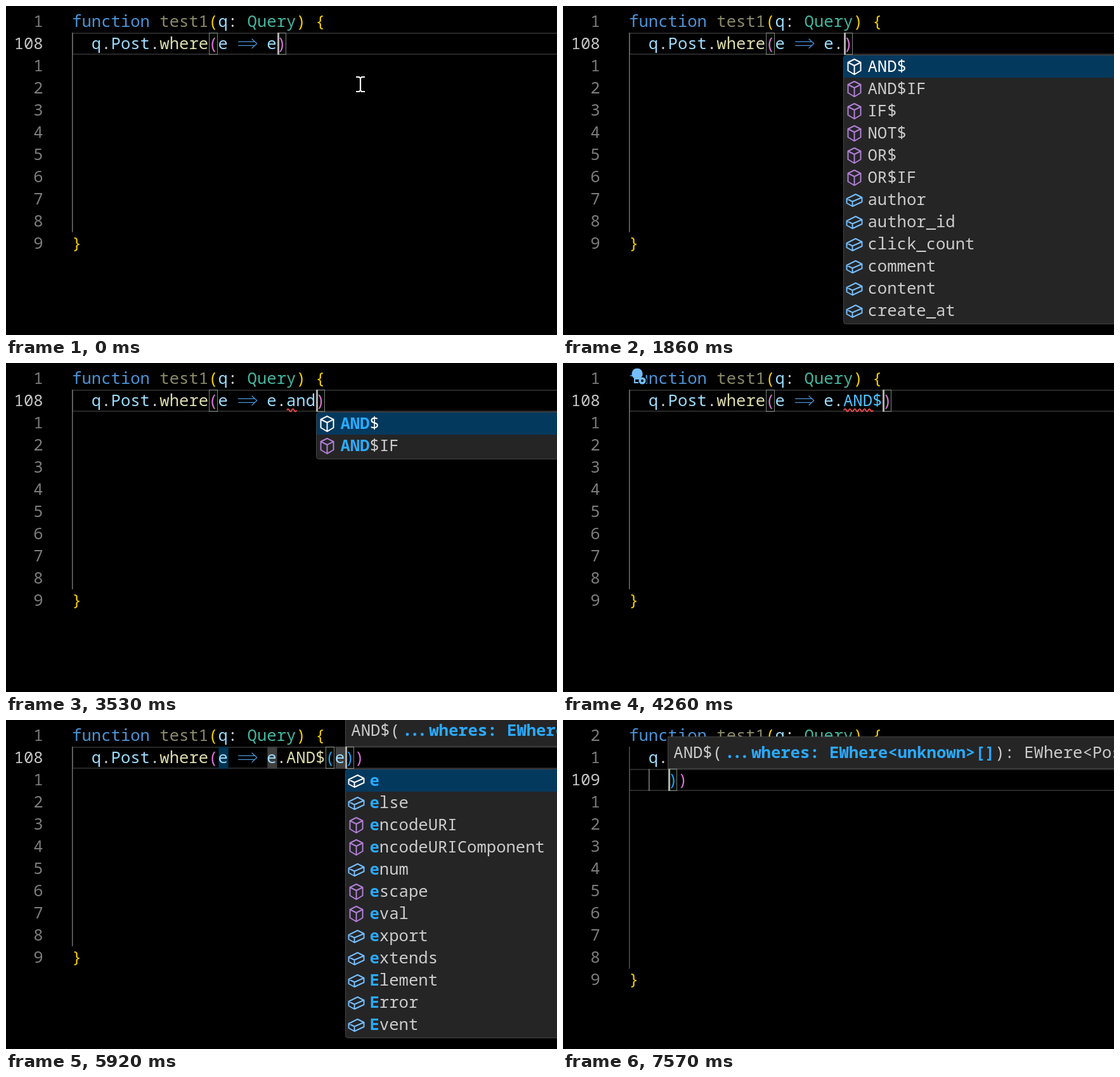
An HTML page that plays this animation: 869x519 px, repeating every 8000 ms.

```html
<!DOCTYPE html>
<html lang="en">
<head>
<meta charset="utf-8">
<title>Editor completion</title>
<style>
  html, body { margin: 0; width: 100%; height: 100%; overflow: hidden; background: #000; }
  svg { display: block; width: 869px; height: 519px; }
  text { font: 200 25.6px "Noto Sans Mono", "DejaVu Sans Mono", monospace; font-variant-ligatures: none; }
  .list { font-weight: 300; }
  .sig { font-weight: 450; }
  .b { font-weight: 700; fill: #2aaaff; }
</style>
</head>
<body>
<svg id="stage" viewBox="0 0 869 519"></svg>
<script>
const LOOP = 8000, CW = 15.36, LH = 35, X0 = 105, Y0 = 7;
const C = {
  key: '#4c93d6', fn: '#dcdcaa', dim: '#8a8a68', name: '#9cdcfe', type: '#45b59f', op: '#d4d4d4',
  konst: '#4fc1ff', p1: '#f2cc00', p2: '#da70d6', p3: '#179fff', method: '#b180d7', field: '#75beff'
};

// '*' marks the next letter as matched, a leading '#' marks a method.
const LISTS = {
  all: '#AND$ #AND$IF #IF$ #NOT$ #OR$ #OR$IF author author_id click_count comment content create_at',
  a: '*author *author_id #*AND$ #*AND$IF is_*archive create_*at delete_*at t*ags update_*at',
  an: '#*A*ND$ #*A*ND$IF',
  and: '#*A*N*D$ #*A*N*D$IF',
  e: '*e *else #*encodeURI #*encodeURIComponent *enum #*escape #*eval *export *extends *Element *Error *Event'
};

// Each step changes part of the state; "code" is what follows "e => e".
const STEPS = [
  [0, { code: '', caret: 1, mouse: 1 }],
  [70, { mouse: 0 }],
  [140, { marks: 1 }],
  [410, { caret: 0 }],
  [870, { caret: 1 }],
  [1400, { caret: 0 }],
  [1860, { code: '.', caret: 1, marks: 0, list: 'all' }],
  [2190, { bright: 1, wave: 1 }],
  [2390, { caret: 0 }],
  [2610, { code: '.a', caret: 1, wave: 0, list: 'a', hover: 7 }],
  [3010, { bright: 0, wave: 1 }],
  [3140, { caret: 0 }],
  [3400, { code: '.an', caret: 1, list: 'an', hover: -1 }],
  [3530, { code: '.and', list: 'and' }],
  [3930, { wave: 3 }],
  [4060, { code: '.AND$', list: '' }],
  [4190, { bulb: 1 }],
  [4390, { bulb: 0 }],
  [4520, { wave: 0 }],
  [4590, { caret: 0 }],
  [4850, { code: '.AND$()', caret: 1 }],
  [4990, { sig: 1 }],
  [5320, { caret: 0 }],
  [5650, { code: '.AND$(e)', caret: 1 }],
  [5720, { list: 'e' }],
  [5920, { marks: 1 }],
  [6180, { caret: 0 }],
  [6510, { list: '', marks: 0 }],
  [6640, { caret: 1 }],
  [6970, { split: 1, sig: 0 }],
  [7500, { sig: 1 }],
  [7570, { inner: 1 }]
];

const colX = c => X0 + c * CW;
const rowY = r => Y0 + r * LH;
const esc = s => s.replace(/&/g, '&amp;').replace(/</g, '&lt;');
const rect = (x, y, w, h, fill, more = '') =>
  `<rect x="${x}" y="${y}" width="${w}" height="${h}" fill="${fill}" ${more}/>`;
const path = (d, stroke, w, more = '') =>
  `<path d="${d}" fill="none" stroke="${stroke}" stroke-width="${w}" ${more}/>`;
const text = (x, y, s, fill, more = '') =>
  `<text x="${x}" y="${y}" fill="${fill}" ${more}>${s}</text>`;
const code = (row, col, s, fill) => text(colX(col) - .9, rowY(row) + 26, esc(s), fill);
const box = (row, col) =>
  rect(Math.round(colX(col)) + .5, rowY(row) + .5, 13, 34, '#006400',
    'fill-opacity=".1" stroke="#808080" stroke-width="1"');

function icon(x, y, method, color) {
  const d = method
    ? 'M0-12L10-7V6L0 12L-10 6V-7ZM-10-7L0-2L10-7M0-2V12'
    : 'M-12-2L2-9L12-4V3L-3 10L-12 5ZM-12-2L-3 2.5L12-4M-3 2.5V10';
  return path(d, color, 2, `stroke-linejoin="round" transform="translate(${x} ${y})"`);
}

function suggest(items, x, hover) {
  const rows = items.split(' ');
  let out = rect(x + .5, 77.5, 460, rows.length * LH + 4, '#252526', 'rx="4" stroke="#454545"');
  rows.forEach((raw, i) => {
    const method = raw[0] === '#', y = 78 + i * LH, on = i === 0;
    const label = raw.replace('#', '').replace(/\*(.)/g, '<tspan class="b">$1</tspan>');
    if (on || i === hover) out += rect(x + 1, y, 460, LH, on ? '#04395e' : '#2a2d2e');
    out += icon(x + 17.5, y + 18, method, on ? '#fff' : method ? C.method : C.field);
    out += text(x + 38.5, y + 26, label, on ? '#fff' : '#ccc', 'class="list"');
  });
  return out;
}

function signature(x, y) {
  const at = n => x + 9.3 + n * CW, base = y + 34;
  const dots = [98, 109.7, 121.4].map(d => `<circle cx="${x + d}" cy="${base - 2.3}" r="2.4" fill="#2aaaff"/>`);
  return rect(x + .5, y + .5, 900, 50, '#252526', 'stroke="#454545"') +
    text(at(0), base, 'AND$(', '#ccc', 'class="sig"') + dots.join('') +
    text(at(8), base, esc('wheres: EWhere<unknown>[]'), '#2aaaff', 'class="b"') +
    text(at(33), base, esc('): EWhere<Post>'), '#ccc', 'class="sig"');
}

function wave(col, n) {
  const count = Math.round(n * CW / 3.84);
  return path(`M${colX(col)} 74.5q1.92-4 3.84 0` + 't3.84 0'.repeat(count - 1), '#f14c4c', 1.8);
}

const bulb = () => rect(110, 8, 14, 26, '#000') +
  '<circle cx="125" cy="28" r="7.5" fill="#000"/>' +
  `<path d="M117 8.5a8.5 8.5 0 0 1 5 15.4V26H112V23.9A8.5 8.5 0 0 1 117 8.5Z" fill="${C.field}"/>` +
  path('M113 26V31H119', C.field, 2.2) +
  `<circle cx="125" cy="28" r="5.6" fill="${C.field}"/><circle cx="125" cy="28" r="2" fill="#000"/>`;

const mouse = () => path('M552 112H557L559 114L561 112H566M559 113V134M552 135H557L559 133L561 135H566', '#fff', 2.2);

function arrow(col) {
  const x = colX(col), y = 59.3;
  return path(`M${x} ${y - 3}h26M${x} ${y + 3}h26M${x + 21.5} ${y - 7.5}L${x + 29.5} ${y}L${x + 21.5} ${y + 7.5}`, C.key, 1.3);
}

function draw(s) {
  const active = s.split ? 2 : 1, last = active + 9;
  const call = s.code.includes('('), body = s.code.replace(/[.()]/g, '');
  const word = body.slice(0, call ? 4 : 9);
  const closeCol = 21 + s.code.length;
  const caretCol = s.split ? 4 : call ? closeCol - 1 : closeCol;
  let o = '';

  o += rect(105, rowY(active) + 1, 780, 33, 'none', 'stroke="#282828" stroke-width="2"');
  o += rect(104, 42, 1.5, (last - 1) * LH, s.inner ? '#505050' : '#707070');
  if (s.split) o += rect(135, rowY(2), 1.5, LH, s.inner ? '#808080' : '#505050');

  for (let r = 0; r <= last; r++) {
    const on = r === active;
    o += text(58.7, rowY(r) + 26, on ? 107 + active : Math.abs(r - active),
      on ? '#c6c6c6' : '#7c7c7c', 'text-anchor="end"');
  }

  if (s.marks) {
    o += rect(colX(15), 42, CW, LH, '#003452') + rect(colX(20), 42, CW, LH, '#3f3f3f');
    if (call) o += rect(colX(27), 42, CW, LH, '#3f3f3f');
  }
  if (s.split) o += box(1, 26) + box(2, 4);
  else o += box(1, call ? 26 : 14) + box(1, caretCol);

  o += code(0, 0, 'function', C.key) + code(0, 9, 'test1', s.bright ? C.fn : C.dim) +
    code(0, 14, '(', C.p1) + code(0, 15, 'q', C.name) + code(0, 16, ':', C.op) +
    code(0, 18, 'Query', C.type) + code(0, 23, ')', C.p1) + code(0, 25, '{', C.p1);
  o += code(1, 2, 'q', C.name) + code(1, 3, '.', C.op) + code(1, 4, 'Post', C.name) +
    code(1, 8, '.', C.op) + code(1, 9, 'where', C.fn) + code(1, 14, '(', C.p2) +
    code(1, 15, 'e', C.name) + arrow(17) + code(1, 20, 'e', C.name);
  if (s.code) o += code(1, 21, '.', C.op);
  if (word) o += code(1, 22, word, call ? C.fn : word[0] === 'A' ? C.konst : C.name);
  if (call) o += code(1, 26, '(', C.p3) + code(1, 27, body.slice(4), C.name);
  if (s.split) o += code(2, 4, ')', C.p3) + code(2, 5, ')', C.p2);
  else {
    if (call) o += code(1, caretCol, ')', C.p3);
    o += code(1, closeCol, ')', C.p2);
  }
  o += code(last, 0, '}', C.p1);

  const caretX = Math.round(colX(caretCol));
  if (s.wave) o += wave(22, s.wave);
  if (s.caret) o += rect(caretX, rowY(active), 3, LH, '#aeafad');
  if (s.list) o += suggest(LISTS[s.list], Math.floor(colX(caretCol)), s.hover);
  if (s.sig) o += signature(Math.floor(colX(caretCol)) - (s.split ? 1 : 0), rowY(active) - 51);
  if (s.bulb) o += bulb();
  if (s.mouse) o += mouse();
  return o;
}

const stage = document.getElementById('stage');
let state = { hover: -1 };
const views = STEPS.map(([time, patch]) => {
  state = { ...state, ...patch };
  return { time, svg: draw(state) };
});

let shown = null;
function tick() {
  const t = performance.now() % LOOP;
  const view = views.filter(v => v.time <= t).pop();
  if (view !== shown) stage.innerHTML = view.svg;
  shown = view;
  requestAnimationFrame(tick);
}
tick();
</script>
</body>
</html>
```
